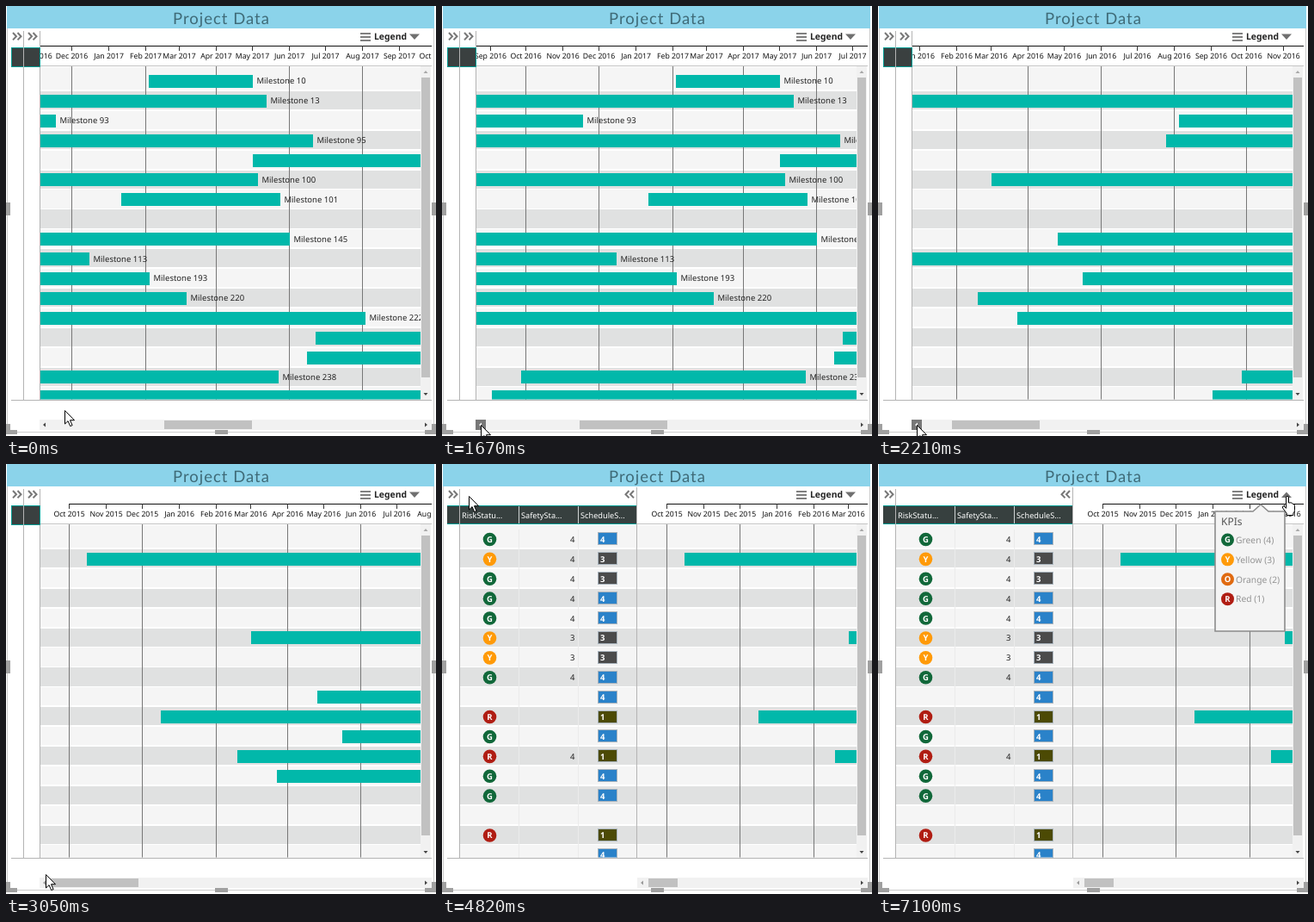
An HTML page that plays this animation: 500x499 px, repeating every 8340 ms.

```html
<!DOCTYPE html>
<html lang="en">
<head>
<meta charset="utf-8">
<title>Project Data</title>
<style>
html, body { margin: 0; width: 100%; height: 100%; overflow: hidden; background: #fff; }
svg { display: block; width: 500px; height: 499px; }
text { font-family: "Segoe UI", "Open Sans", "Noto Sans", sans-serif; font-size: 9.5px; fill: #222; text-rendering: geometricPrecision; }
rect { shape-rendering: crispEdges; }
.title { font: 18.5px "Comic Sans MS", Lato, sans-serif; letter-spacing: 1px; fill: #3f6b78; }
.axis { font-size: 8.7px; fill: #111; }
.head { font-size: 9.2px; fill: #fff; }
.badge { font-size: 9.5px; font-weight: 600; fill: #fff; }
.legend { font-size: 10.4px; font-weight: 600; }
.kpi { font-size: 12px; fill: #555; }
.key { font-size: 10.3px; fill: #949494; }
</style>
</head>
<body>
<svg id="stage" viewBox="0 0 500 499"></svg>
<script>
const LOOP = 8340, HOVER_AT = 1010, PRESS_AT = 1240, LEAVE_AT = 3050;
const OPEN_AT = 4820, HAND_AT = 6540, LEGEND_AT = 7100;
const PX_DAY = 1.389, ORIGIN = 73.5, ROW = 22.9, PANEL = 188, FAR = 1250;
const TEAL = '#01b8aa', EDGE = '#079d94', GREY = '#777', LINE = '#b4b4b4', FRAME = '#cbcbcb';
const KPI = { G: '#11683a', Y: '#ff9a08', O: '#e06a10', R: '#b01d13' };
const BOX = { 4: '#2a82c9', 3: '#4b4b4b', 1: '#4c4a04' };

const stage = document.getElementById('stage');
const rowY = i => 87.46 + ROW * i;

function add(parent, tag, attrs = {}, content) {
  const el = document.createElementNS('http://www.w3.org/2000/svg', tag);
  for (const k in attrs) el.setAttribute(k, attrs[k]);
  if (content !== undefined) el.textContent = content;
  return parent.appendChild(el);
}
const group = (parent, attrs) => add(parent, 'g', attrs);
const rect = (p, x, y, width, height, fill, more) => add(p, 'rect', { x, y, width, height, fill, ...more });
const path = (p, d, fill, more) => add(p, 'path', { d, fill, ...more });
const text = (p, x, y, s, cls = '', anchor = 'start') =>
  add(p, 'text', { x, y, class: cls, 'text-anchor': anchor }, s);
const vline = (p, x, y1, y2, color) => rect(p, x, y1, 1, y2 - y1, color);
const show = (el, on) => el.setAttribute('visibility', on ? 'visible' : 'hidden');
const move = (el, x, y = 0) => el.setAttribute('transform', `translate(${x} ${y})`);

function clip(id, x, y, width, height) {
  return rect(add(stage, 'clipPath', { id }), x, y, width, height, '#000');
}
function chevrons(p, x, dir) {
  const part = dx => `M${x + dir * dx} 31l${dir * 4} 4.2l${-dir * 4} 4.2`;
  path(p, part(0) + part(5.5), 'none', { stroke: GREY, 'stroke-width': 2 });
}
function badge(p, x, y, letter, r) {
  add(p, 'circle', { cx: x, cy: y, r, fill: KPI[letter] });
  text(p, x, y + 3.5, letter, 'badge', 'middle');
}

rect(stage, 0, 0, 500, 499, '#fff');

// row stripes
for (let i = 0; i < 17; i++) {
  const top = i ? 76 + ROW * i : 71;
  rect(stage, 21, top, 461, Math.min(97.2 + ROW * i, 457) - top, i % 2 ? '#e0e1e1' : '#f5f5f5');
}

// timeline
const chartClip = clip('chart', 39, 70, 443, 386.5), axisClip = clip('axis', 39, 40, 456, 30);
const chart = group(group(stage, { 'clip-path': 'url(#chart)' }));
const axis = group(group(stage, { 'clip-path': 'url(#axis)' }));
const start = Date.UTC(2015, 9, 1);

rect(axis, Math.floor(ORIGIN), 46, 1400, 1, '#111');
for (let m = 0; m < 26; m++) {
  const date = new Date(Date.UTC(2015, 9 + m, 1));
  const x = Math.floor(ORIGIN + (date - start) / 864e5 * PX_DAY);
  const month = date.toLocaleString('en-US', { month: 'short', timeZone: 'UTC' });
  vline(axis, x, 46, 52, '#333');
  text(axis, x + 0.5, 61, `${month} ${date.getUTCFullYear()}`, 'axis', 'middle');
  if (m % 2 === 0) vline(chart, x, 70, 457, GREY);
}

// one bar per row: from, to, milestone number
const BARS = [
  [756, 877, 10], [94, 893, 13], [503, 648, 93], [488, 947, 95], [877, FAR], [285, 883, 100],
  [724, 909, 101], [], [362, 920, 145], [180, 687, 113], [391, 757, 193], [269, 800, 220],
  [315, 1008, 222], [950, FAR], [940, FAR], [576, 907, 238], [542, FAR]
];
BARS.forEach(([from, to, number], row) => {
  if (to) rect(chart, from, rowY(row) - 7.5, to - from, 15, TEAL);
  if (number) text(chart, to + 4.5, rowY(row) + 3, 'Milestone ' + number);
});

// rules and vertical scrollbar
rect(stage, 39, 69, 456, 1, '#c4c4c4');
rect(stage, 482, 70, 12, 387, '#f1f1f1');
rect(stage, 483, 83, 10, 348, '#c1c1c1');
path(stage, 'M485.5 78h5l-2.5-3z', '#a8a8a8');
path(stage, 'M485.5 449h5l-2.5 3z', '#444');
rect(stage, 6, 457, 489, 1, LINE);

// horizontal scrollbar
const track = rect(stage, 39, 480, 456, 12, '#f1f1f1');
const thumb = rect(stage, 52, 481, 102, 10, '#c1c1c1');
const button = rect(stage, 39, 480, 12, 12, '#f1f1f1');
const buttonArrow = path(stage, 'M46 483.5v5l-3-2.5z', '#444');
path(stage, 'M487 483.5v5l3-2.5z', '#444');

// collapsed side
const closed = group(stage);
rect(closed, 21, 71, 18, 386, '#fff');
vline(closed, 39, 29, 457, LINE);
rect(closed, 6.5, 48.5, 32.5, 21.5, '#3a4040', { stroke: EDGE });
vline(closed, 20, 49, 70, EDGE);
chevrons(closed, 26, 1);

// expanded side
const open = group(stage);
rect(open, 6, 48, 221, 22, EDGE);
rect(open, 6, 49, 221, 20, '#37403f');
['RiskStatu...', 'SafetySta...', 'ScheduleS...'].forEach((s, i) => {
  const x = 20 + 69 * i;
  vline(open, x, 49, 69, '#cfd4d4');
  vline(open, x, 76, 457, '#ebebeb');
  text(open, x + 3, 62.5, s, 'head');
});
vline(open, 226, 27, 457, LINE);
chevrons(open, 223, -1);

clip('cells', 21, 70, 206, 386.5);
const cells = group(open, { 'clip-path': 'url(#cells)' });
'G44 Y43 G43 G44 G44 Y33 Y33 G44 --4 R-1 G-4 R41 G-4 G-4 --- R-1 --4'.split(' ').forEach((row, i) => {
  const [risk, safety, schedule] = row, y = rowY(i);
  if (risk !== '-') badge(cells, 55.5, y, risk, 7.8);
  if (safety !== '-') text(cells, 154.5, y + 3.5, safety, '', 'end');
  if (schedule !== '-') {
    rect(cells, 181.5, y - 7.5, 22, 14, BOX[schedule], { stroke: '#a9b4bd' });
    text(cells, 184, y + 3.5, schedule, 'badge');
  }
});

// header
vline(stage, 20, 29, 457, LINE);
chevrons(stage, 8, 1);
rect(stage, 1, 0, 497, 26, '#8bd3ea');
text(stage, 250.5, 20.6, 'Project Data', 'title', 'middle');
for (let y = 31; y < 40; y += 4) rect(stage, 412, y, 12, 2, '#808080');
text(stage, 428, 39, 'Legend', 'legend');
const down = path(stage, 'M469 32.5h12l-6 6.5z', '#707070');
const up = path(stage, 'M469 39h12l-6-6.5z', '#707070');

// frame with its mirrored handles
rect(stage, 2, 494, 496, 1, FRAME);
const handle = (x, y, w, h) => rect(stage, x, y, w, h, '#a0a0a0');
for (const right of [false, true]) {
  const side = w => right ? 499.5 - w : 0;
  vline(stage, right ? 497 : 1, 26, 495, FRAME);
  handle(side(5), 228, 5, 15);
  handle(side(5), 485, 5, 12);
  handle(side(13), 492, 13, 5);
}
handle(243, 492, 15, 5);

// legend popup
const popup = group(stage);
path(popup, 'M392 55H436l9-8l9 8H473V194H392z', '#f4f4f4', { stroke: '#8c8c8c', 'stroke-width': 1.6 });
text(popup, 399, 71, 'KPIs', 'kpi');
['Green (4)', 'Yellow (3)', 'Orange (2)', 'Red (1)'].forEach((s, i) => {
  badge(popup, 406.5, rowY(i) + 0.5, s[0], 7.5);
  text(popup, 416, rowY(i) + 4.3, s, 'key');
});

// pointers
const ink = { stroke: '#000', 'stroke-linejoin': 'round' };
const arrow = path(stage, 'M.5 .5V16l3.6-3.4 2.6 6 2.4-1-2.6-5.9h5z', '#fff', ink);
const hand = path(stage,
  'M474.5 39q0-1.6 1.5-1.6t1.5 1.6v6q4-1 5 1.5 2-.4 2 2v5q0 2-1.6 3.5v2.6h-7.6v-2.2l-4.7-6.3q-1-2.4 1.2-2.2l2.8 2.4z',
  '#fff', ink);

// the screen updates in even ticks
const TICK = 1150 / 26;
const snap = t => 1900 + Math.floor((t - 1900) / TICK + 1e-3) * TICK;
const clamp = p => Math.max(0, Math.min(1, p));
const ease = p => (p + p * p * (3 - 2 * p)) / 2;

// one click, then a held button
const SCROLL = [[1195, 590], [1400, 561], [1495, 561], [1900, 337], [2210, 153], [2493, 0]];
function scrollAt(t) {
  let value = SCROLL[0][1];
  for (let i = 1; i < SCROLL.length; i++) {
    const [t0, v0] = SCROLL[i - 1], [t1, v1] = SCROLL[i];
    value += (v1 - v0) * clamp((t - t0) / (t1 - t0));
  }
  return Math.round(value);
}

// pointer moves, each bowed sideways by bend
const MOVES = [
  { from: 480, to: 1050, x: 45, y: 486 },
  { from: 3016, to: 3870, x: 23, y: 42, bend: [18, 0] },
  { from: 3900, to: 4020, x: 31, y: 37 },
  { from: 5670, to: 6480, x: 471, y: 39, bend: [0, 9] }
];
function pointerAt(t) {
  let x = 68, y = 469;
  for (const { from, to, bend = [0, 0], ...end } of MOVES) {
    const p = ease(clamp((t - from) / (to - from))), bow = Math.sin(Math.PI * p);
    x += (end.x - x) * p + bend[0] * bow;
    y += (end.y - y) * p + bend[1] * bow;
  }
  return [Math.round(x), Math.round(y)];
}

function draw(time) {
  const t = time % LOOP, s = snap(t);
  const isOpen = t >= OPEN_AT, hasLegend = t >= LEGEND_AT;
  const scroll = scrollAt(s), shift = isOpen ? PANEL : 0, left = 39 + shift;

  for (const [el, right] of [[chartClip, 482], [axisClip, 495], [track, 495]]) {
    el.setAttribute('x', left);
    el.setAttribute('width', right - left);
  }
  move(chart, shift - scroll);
  move(axis, shift - scroll);

  thumb.setAttribute('x', left + 13 + scroll * 0.2237);
  thumb.setAttribute('width', isOpen ? 34 : 102);
  const pressed = t >= PRESS_AT && scroll > 0;
  const hover = t >= HOVER_AT && t < LEAVE_AT && scroll > 0;
  button.setAttribute('x', left);
  button.setAttribute('fill', pressed ? '#787878' : hover ? '#d2d2d2' : '#f1f1f1');
  buttonArrow.setAttribute('fill', pressed ? '#fff' : scroll ? '#444' : '#9a9a9a');
  move(buttonArrow, shift);

  show(closed, !isOpen);
  show(open, isOpen);
  show(popup, hasLegend);
  show(up, hasLegend);
  show(down, !hasLegend);
  show(arrow, t < HAND_AT);
  show(hand, t >= HAND_AT);
  move(arrow, ...pointerAt(s));
}

const began = performance.now();
function frame() {
  draw(performance.now() - began);
  requestAnimationFrame(frame);
}
frame();
</script>
</body>
</html>
```
